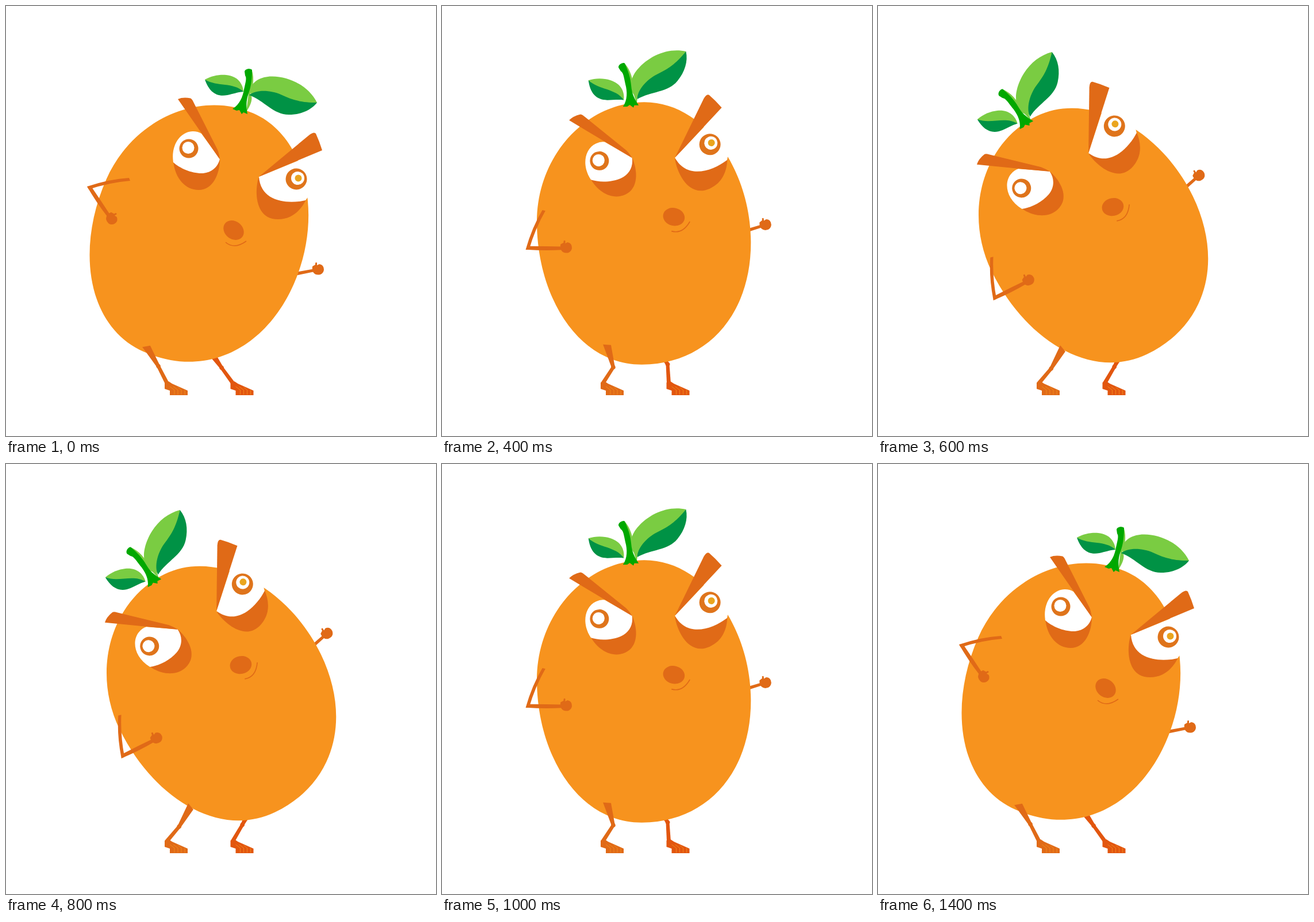
An HTML page without scripts that plays this animation: 748 by 748 pixels, repeating every 1.45 s.

```html
<!DOCTYPE html>
<html lang="en">
<head>
<meta charset="utf-8">
<title>Swaying orange</title>
<style>
  /* One clock counts the 50 ms steps of a sway; every pose is a formula of it. */
  @property --step { syntax: "<number>"; inherits: true; initial-value: 0; }
  @keyframes sway {
    0% { --step: 0; animation-timing-function: steps(14); }
    96.552%, 100% { --step: 14; }
  }

  html, body { margin: 0; height: 100%; overflow: hidden; background: #fff; }
  svg {
    display: block; width: 100vw; height: 100vh;
    animation: sway 725ms -4ms infinite alternate;

    --x: calc(var(--step) / 14);
    --lean: calc(1.34 * pow(var(--x), 2) - .34 * pow(var(--x), 8));
    --ramp: clamp(0, (var(--step) - 2) / 7, 1);
    --flap: calc(var(--ramp) * var(--ramp) * (3 - 2 * var(--ramp)));
    --crouch: pow(sin(180deg * var(--lean)), 2);
  }

  .torso {
    transform:
      translate(calc(336.5px + 26px * var(--lean) + 18px * pow(var(--lean), 2)),
                calc(395px + 4px * pow(var(--lean), 2)))
      rotate(calc(-56deg * var(--lean)))
      translate(-336.5px, -395px);
  }
  .flap { transform: rotate(calc(var(--swing) * var(--flap))); }
  .far-arm { --swing: 19deg; transform-origin: 508px 440px; }
  .near-arm { --swing: -33deg; transform-origin: 178.5px 331px; }
  .big-leaf { --swing: -28deg; transform-origin: 470px 168px; }
  .small-leaf { --swing: 38deg; transform-origin: 376px 139px; }

  .near-leg {
    --shin: calc(-27deg + 67deg * pow(var(--flap), 2));
    --knee: calc(-5deg - 46deg * var(--crouch));
  }
  .far-leg {
    --shin: calc(-36deg + 75deg * var(--lean));
    --knee: calc(-32deg * var(--crouch));
  }
  .shin { transform: rotate(var(--shin)); }
  .thigh { transform: translate(0, -33px) rotate(var(--knee)); }

  .skin { fill: #f7931e; }
  .brown { fill: #e06a17; }
  .red { fill: #e2560f; }
  .ring { fill: #df741b; }
  .light { fill: #7acc42; }
  .dark { fill: #009245; }
  .stem { fill: #00a800; }
  .white { fill: #fff; }
  .gold { fill: #eaa51e; }
  .mouth { fill: none; stroke: #e06a17; stroke-width: 1.6; }
  .stripes { fill: none; stroke: #f7931e; stroke-width: .8; }
</style>
</head>
<body>
<svg viewBox="0 0 748 748">
  <defs>
    <path id="hand" d="M-10 -5 L-5 -8 V-11 Q-3 -13 -2 -11 V-7 L2 -9 Q10 -8 10 1 Q9 7 4 9 Q-4 11 -8 6 Q-11 2 -10 -5Z"/>
    <g id="leg">
      <g class="shin">
        <path d="M-3.5 1 L-3 -33 H3 L3.5 1Z"/>
        <g class="thigh">
          <circle r="3.8"/>
          <path d="M-3 0 L-6 -43 L7 -38 L3 0Z"/>
        </g>
      </g>
      <path d="M-4 -1 L3 -3 L9 1 L36 13 V21 H5 V13 L-4 10Z"/>
      <path class="stripes" d="M5 6 l8 6 v8 m6 0 v-8 l-8 -6 m8 1 l6 5 v8 m6 0 v-8"/>
    </g>
  </defs>

  <g class="torso">
    <g class="flap far-arm brown">
      <path d="M537 457 L493 465 V471 L537 462Z"/>
      <use href="#hand" x="543" y="458"/>
    </g>
  </g>
  <use href="#leg" class="far-leg red" transform="translate(394.5 656)"/>

  <g class="torso">
    <path class="skin" transform="translate(336.5 395) rotate(23.8)" d="M2 -228.5 C105 -228.5 186 -112 186 15 C186 140 110 228 -5 228 C-115 228 -186 110 -186 -20 C-186 -135 -100 -228.5 2 -228.5Z"/>

    <!-- left eye -->
    <path class="brown" d="M291 270 C294 300 312 320 335 320 C360 320 372 292 372 266Z"/>
    <path class="white" d="M340 222 L372 266 C368 282 355 291 340 291 C322 291 302 282 291 272 C286 240 305 218 325 218 Q334 218 340 222Z"/>
    <circle class="ring" cx="318" cy="248" r="16.5"/>
    <circle class="white" cx="317" cy="246.5" r="10.5"/>
    <path class="brown" d="M299 162 Q308 158 321 160.5 Q324 162 326 167 L368 250 Q371 258 372 267Z"/>

    <!-- right eye -->
    <path class="brown" d="M439 299 C432 325 434 371 473 371 C498 371 513 355 522 337Z"/>
    <path class="white" d="M440 297 L525 262 L535 300 L529 327 L521 338 C490 345 443 341 440 297Z"/>
    <circle class="ring" cx="505" cy="301" r="18.5"/>
    <circle class="white" cx="507.5" cy="299.5" r="11.5"/>
    <circle class="gold" cx="508.5" cy="299.5" r="6"/>
    <path class="brown" d="M440 297 L528 224 Q536 218 539 222 Q545 235 550 251Z"/>

    <ellipse class="brown" rx="19" ry="15.5" transform="translate(396 390) rotate(38)"/>
    <path class="mouth" d="M382 411 Q397 424 418 409"/>

    <g class="flap small-leaf">
      <path class="light" d="M346 128 C358 121 372 119 383 120 C403 122 412 135 413 149 C395 150 365 145 346 128Z"/>
      <path class="dark" d="M346 128 C368 141 395 132 413 149 C402 150 395 153 385 155 C365 159 353 148 346 128Z"/>
    </g>
    <path class="light" d="M427 110 C431 120 432 136 425 153 C431 160 425 174 418 184Z"/>
    <g class="flap big-leaf">
      <path class="light" d="M426 154 C421 132 445 122 463 122.5 C495 123 527 140 541 168 C500 175 460 155 426 154Z"/>
      <path class="dark" d="M423 155 C435 145 460 146 478 154 C497 163 512 168 541 168 C530 182 512 189 492 189 C465 189 450 165 423 155Z"/>
    </g>
    <path class="stem" d="M415 114 C416 108 428 108 428 112 C428 125 427 138 422 152 C417 166 418 176 420 188 L413 185 L410 188 L406 181 L401 182 L394 179 C406 172 412 158 414 145 C417 132 419 125 416 121Z"/>

    <g class="flap near-arm brown">
      <path d="M214 299 Q180 301 141 314 L144 319 Q180 307 216 304Z"/>
      <path d="M141 314 L149 315 Q166 340 181 363 L176 366 Q158 343 141 314Z"/>
      <use href="#hand" transform="translate(184 370) rotate(58)"/>
    </g>
  </g>

  <use href="#leg" class="near-leg brown" transform="translate(280 656)"/>
</svg>
</body>
</html>
```
